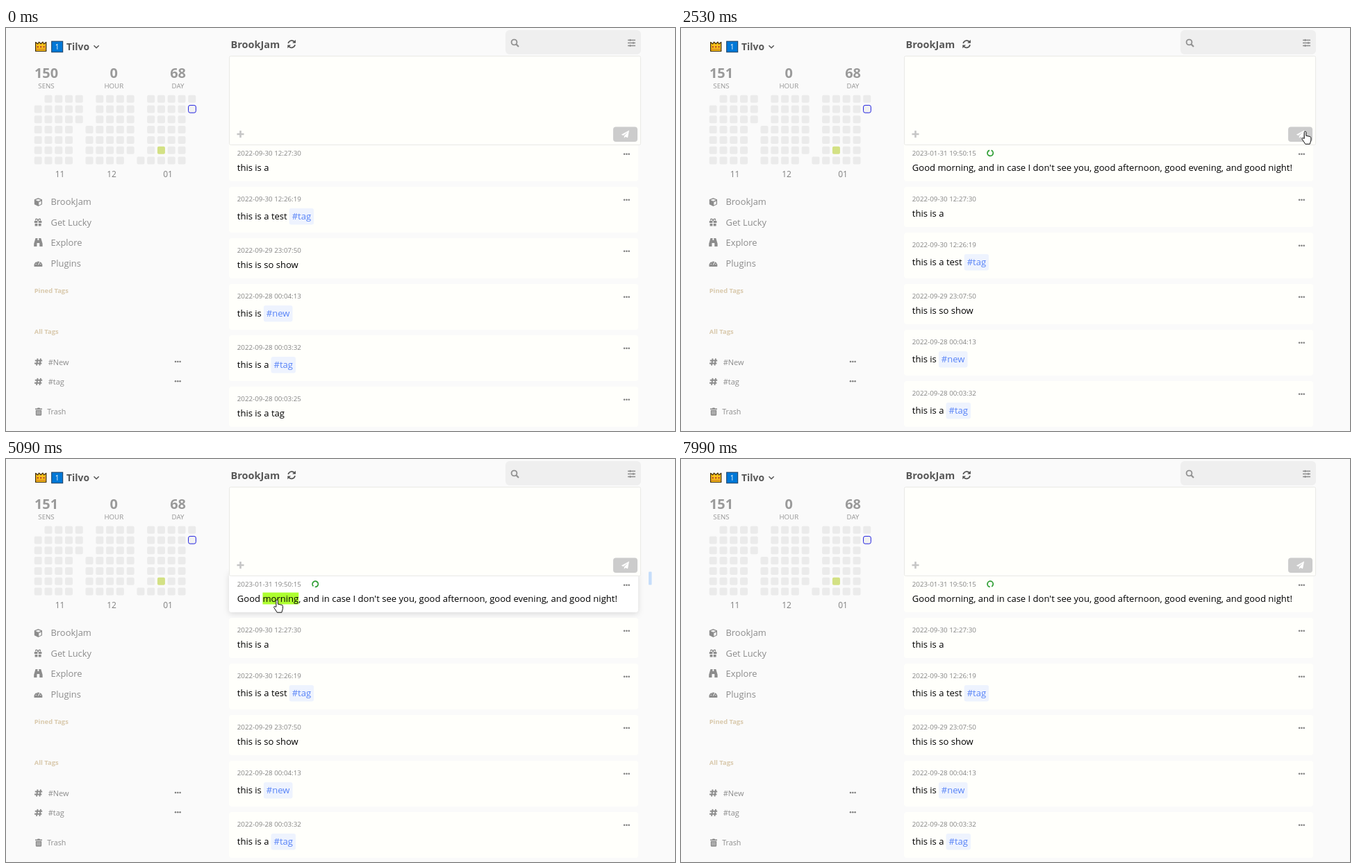
Animation of 963x581 px, one loop 8.05 s. Source, as an HTML page:

```html
<!DOCTYPE html>
<html lang="en">
<head>
<meta charset="utf-8">
<title>Memo board</title>
<style>
html, body { margin: 0; width: 100%; height: 100%; overflow: hidden; background: #fafafa; }
svg { display: block; width: 963px; height: 581px; font-family: "Open Sans", "Noto Sans", sans-serif; }
.b { font-weight: 700; }
.mid { text-anchor: middle; }
.mono { font: 11.7px "Liberation Mono", monospace; white-space: pre; }
</style>
</head>
<body>
<svg id="stage" viewBox="0 0 963 581"></svg>
<script>
const LOOP = 8050, POST = 2530, PASTE = 910;
const QUOTE = "Good morning, and in case I don't see you, good afternoon, good evening, and good night!";
const stage = document.getElementById("stage");

function add(parent, tag, attrs, text) {
  const el = document.createElementNS("http://www.w3.org/2000/svg", tag);
  for (const k in attrs) el.setAttribute(k, attrs[k]);
  if (text !== undefined) el.textContent = text;
  parent.appendChild(el);
  return el;
}
const rect = (p, x, y, width, height, rx, fill, more) =>
  add(p, "rect", { x, y, width, height, rx, fill, ...more });
const label = (p, x, y, size, fill, text, cls = "") =>
  add(p, "text", { x, y, "font-size": size, fill, class: cls }, text);
const solid = (p, d, fill, more) => add(p, "path", { d, fill, ...more });
const line = (p, d, stroke, w, more) =>
  add(p, "path", { d, stroke, "stroke-width": w, fill: "none", ...more });
const group = (p, x = 0, y = 0) => add(p, "g", { transform: `translate(${x} ${y})` });
const show = (el, on) => el.setAttribute("visibility", on ? "visible" : "hidden");
const clamp = v => Math.max(0, Math.min(1, v));

function dots(p, x, y) {
  for (let i = -1; i < 2; i++) add(p, "circle", { cx: x + i * 3.3, cy: y, r: 1.3, fill: "#808080" });
}

// Sidebar
function sidebar() {
  const g = group(stage), grey = "#8c8c8c";
  solid(g, "M42.6 20.5l3.2 2.5 1.6-2.8 2.8 2.6 2.8-2.6 1.6 2.8 3.2-2.5v13h-15.2z", "#fcc21b", { stroke: "#3d2a08", "stroke-width": 1.2, "stroke-linejoin": "round" });
  line(g, "M43.2 30.8h14", "#d68a1c", 1.6);
  solid(g, "M44.8 26h2v2.4h-2zm4.4 0h2v2.4h-2zm4.4 0h2v2.4h-2z", "#b5462a");
  rect(g, 65.7, 19.2, 16, 15.6, 0, "#0078d7", { stroke: "#173a5e", "stroke-width": 1 });
  label(g, 73.7, 30.5, 10, "#fff", "1", "mid");
  label(g, 87, 32, 13.9, "#585858", "Tilvo", "b");
  line(g, "M126.5 25.2l3.6 3.6 3.6-3.6", "#555", 1.5);

  [[58, "150", "SENS"], [155.3, "0", "HOUR"], [247.5, "68", "DAY"]].forEach(([x, n, unit]) => {
    const num = label(g, x, 72, 19.9, "#9a9a9a", n, "b mid");
    if (n === "150") counter = num;
    label(g, x, 86.5, 9.7, "#949494", unit, "mid");
  });

  const full = "1111.11111.1111.";
  const rows = [".1111.1111.11111", "11111.1111.11111", "11111.1111.1111.", full, full, full, "1111.1111.11111."];
  rows.forEach((row, r) => [...row].forEach((c, i) => {
    if (c === ".") return;
    const x = 40.7 + i * 14.77, y = 96.7 + r * 14.8;
    if (r === 1 && i === 15) rect(g, x + .3, y - .1, 10.8, 10.8, 2.5, "#f2f2f2", { stroke: "#2222e0", "stroke-width": 1 });
    else rect(g, x, y, 11, 11, 2, r === 5 && i === 12 ? "#d3e184" : "#ebebeb");
  }));
  [[77.5, "11"], [152, "12"], [233, "01"]].forEach(([x, m]) => label(g, x, 214.5, 12, "#808080", m, "mid"));

  ["BrookJam", "Get Lucky", "Explore", "Plugins"].forEach((s, i) =>
    label(g, 64.5, 255.3 + i * 29.4, 12.9, grey, s));
  solid(g, "M46.4 245l5.6 2.3v7l-5.6 2.6-5.6-2.6v-7z", grey);
  solid(g, "M46.4 246.4l4 1.6-4 1.7-4-1.7zM47.2 251l3.6-1.5v4.2l-3.6 1.7z", "#f2f2f2");
  solid(g, "M40.8 278h4.6v3h-4.6zm6 0h4.6v3h-4.6zM41.6 282h3.8v3.5h-3.8zm5.2 0h3.8v3.5h-3.8z", grey);
  line(g, "M46.1 278c-1-4-4.5-3.4-3 -.6M46.1 278c1-4 4.5-3.4 3-.6", grey, 1.4);
  solid(g, "M42.5 303h3v3h1.8v-3h3l2.3 8v4h-4.3v-5h-3.8v5h-4.3v-4z", grey);
  solid(g, "M40.5 343.5a6 6 0 1 1 11.8 0q0 .5-.6.5h-10.6q-.6 0-.6-.5z", grey);
  line(g, "M46.4 341.5l2.2-4.5M42.6 340.5h1.2M44 337l.8.8M49.2 340.5h1.2", "#fafafa", 1);

  label(g, 40.7, 382, 9.4, "#d9c9ac", "Pined Tags", "b");
  label(g, 40.7, 441.3, 9.4, "#d9c9ac", "All Tags", "b");
  [[481.5, "#New"], [509.8, "#tag"]].forEach(([y, s]) => {
    line(g, `M45.6 ${y - 5}l-1.6 10M50 ${y - 5}l-1.6 10M41.8 ${y - 2}h10.4M41 ${y + 2}h10.4`, grey, 1.9);
    label(g, 60.7, y + 4, 11, grey, s);
    dots(g, 247.3, y - .5);
  });
  solid(g, "M42 548.6h3l.7-1h2.6l.7 1h3v1.5h-10zM42.8 550.8h8.4v6.6q0 1.4-1.4 1.4h-5.6q-1.4 0-1.4-1.4z", grey);
  line(g, "M45 552.2v5M47 552.2v5M49 552.2v5", "#fafafa", .6);
  label(g, 59.2, 557.2, 10.7, grey, "Trash");
}

// Memo cards
const memos = [
  ["2023-01-31 19:50:15", QUOTE],
  ["2022-09-30 12:27:30", "this is a"],
  ["2022-09-30 12:26:19", "this is a test", "#tag"],
  ["2022-09-29 23:07:50", "this is so show"],
  ["2022-09-28 00:04:13", "this is", "#new"],
  ["2022-09-28 00:03:32", "this is a", "#tag"],
  ["2022-09-28 00:03:25", "this is a tag"]
];
function card([date, text, tag], y) {
  const el = group(stage, 0, y), h = tag ? 66 : 58, base = tag ? 47.3 : 43.3;
  rect(el, 321, 0, 589, h, 4, "#fffffb");
  const lift = rect(el, 321, 0, 589, h, 4, "#fff", { opacity: 0, style: "filter:drop-shadow(0 2px 4px rgba(0,0,0,.13))" });
  const mark = rect(el, 0, 29.5, 0, 17, 0, "#adff2f");
  label(el, 332.8, 21.2, 9.75, "#838383", date);
  const body = label(el, 332.8, base, 13.06, "#000", text);
  if (tag) {
    const x = 332.8 + body.getComputedTextLength() + 3;
    const pill = rect(el, x, 31, 0, 23.5, 3, "#eef3fe");
    const t = label(el, x + 4, base, 13.06, "#5783f7", tag);
    pill.setAttribute("width", t.getComputedTextLength() + 8);
  }
  dots(el, 893.4, 18.7);
  return { el, lift, mark, body, y, h };
}

let counter;
sidebar();
label(stage, 323.5, 29, 14.5, "#585858", "BrookJam", "b");
line(stage, "M406.3 22.2a5 5 0 0 1 8.8-2.3M416 24.2a5 5 0 0 1-8.8 2.3", "#555", 1.7);
solid(stage, "M417 17v4.8h-4.8zM405.3 29.3v-4.8h4.8z", "#555");
rect(stage, 719, 3, 195, 35, 6, "#efefef");
add(stage, "circle", { cx: 731.5, cy: 20.5, r: 3.9, fill: "none", stroke: "#949494", "stroke-width": 1.9 });
line(stage, "M734.4 23.4l3.6 3.6", "#949494", 2.2);
line(stage, "M895 17.5h11M895 21.5h11M895 25.5h11M898.5 16v3M903 20v3M898.5 24v3", "#8c8c8c", 1.3);

let top0 = 163;
const cards = memos.map(m => {
  const c = card(m, top0);
  top0 += c.h + 8;
  return c;
});
const SHIFT = cards[0].h + 8;
const spinner = add(cards[0].el, "circle", { r: 4.1, fill: "none", stroke: "#2f9e34", "stroke-width": 1.8, "stroke-dasharray": "22.6 3.2" });
const words = [...QUOTE.matchAll(/[\w']+/g)].map(m => [
  cards[0].body.getStartPositionOfChar(m.index).x,
  cards[0].body.getEndPositionOfChar(m.index + m[0].length - 1).x
]);

// Editor
const editor = group(stage);
const glow = rect(editor, 321.5, 40.5, 592, 128, 2, "#add8e6", { style: "filter:drop-shadow(0 1px 5px #9fd3e6)" });
rect(editor, 321.5, 40.5, 592, 128, 2, "#fffffb", { stroke: "#e9e9e6", "stroke-width": 1 });
const draft = group(editor);
[QUOTE.slice(0, 76), QUOTE.slice(77)].forEach((s, i) =>
  add(draft, "text", { x: 333.3, y: 64.8 + i * 16, class: "mono", fill: "#111" }, s));
line(editor, "M337.5 148v10M332.5 153h10", "#c6c6c6", 2.6);
const send = rect(editor, 874, 142.5, 35, 21.5, 4, "#ccc");
solid(editor, "M897 147.6l-2 10.6-3.4-1.5-1.8 2.3v-3.2l5.4-6-6.5 5.3-3-1.3z", "#fff");
const thumb = rect(stage, 925, 162.5, 4.5, 19, 1, "#c5ddfa");

// Pointer shapes, each with its hot spot at 0,0
const pointer = group(stage);
const ink = { stroke: "#111", "stroke-width": 1, "stroke-linejoin": "round" };
const shapes = {
  arrow: solid(pointer, "M0 0V12.3L2.9 9.7 5 14.4 7 13.5 4.9 9H8.6z", "#fff", ink),
  hand: solid(pointer, "M-1.3 10V1.2a1.3 1.3 0 0 1 2.6 0V6l5.4 1.2q1.6.4 1.6 2v3.3l-1.6 5.5h-6.6l-4.4-6.8c-1-1.7.9-2.5 1.8-1.4z", "#fff", ink),
  beam: line(pointer, "M-3-7h2q1 0 1 1V6q0 1-1 1h-2M3-7h-2q-1 0-1 1V6q0 1 1 1h2", "#444", 1)
};

const path = [
  [60, 918, 505], [200, 800, 350], [340, 620, 170], [450, 520, 100], [610, 490, 90],
  [1210, 490, 90], [1330, 760, 132], [1450, 852, 143], [1700, 893, 147], [1930, 899, 149],
  [2530, 899, 149], [2750, 800, 214], [3100, 560, 218], [3390, 488, 212], [3550, 500, 205],
  [3900, 410, 203], [4190, 376, 204], [4350, 850, 206], [4460, 868, 288], [4570, 720, 288],
  [4620, 655, 255], [4670, 621, 211], [4800, 560, 203], [5050, 400, 203], [5250, 352, 204],
  [5630, 361, 206], [5700, 380, 230], [5890, 540, 432], [6300, 940, 520], [6730, 950, 567], [6900, 938, 590]
];
function cursorAt(t) {
  const i = path.findIndex(p => p[0] > t);
  if (i < 1) return null;
  const [t0, x0, y0] = path[i - 1], [t1, x1, y1] = path[i];
  const k = (t - t0) / (t1 - t0);
  return [x0 + (x1 - x0) * k, y0 + (y1 - y0) * k];
}

const cardTop = (i, t) => t < POST && i ? cards[i].y - SHIFT : cards[i].y;
function hovered(i, t) {
  const p = cursorAt(t);
  if (!p || (t < POST && i === 0)) return 0;
  const y = p[1] - cardTop(i, t);
  return +(p[0] > 321 && p[0] < 910 && p[1] > 168 && y > 0 && y < cards[i].h);
}
// Averaging recent hover states gives a soft fade
function lift(i, t) {
  let sum = 0;
  for (let k = 0; k < 6; k++) sum += hovered(i, t - k * 40);
  return sum / 6;
}

function draw(t) {
  const posted = t >= POST, pasted = t >= PASTE && !posted, p = cursorAt(t);
  counter.textContent = posted ? "151" : "150";
  cards.forEach((c, i) => {
    c.el.setAttribute("transform", `translate(0 ${cardTop(i, t)})`);
    c.lift.setAttribute("opacity", lift(i, t));
  });
  show(cards[0].el, posted);
  spinner.setAttribute("transform", `translate(445.2 17.3) rotate(${(t - POST) * .36 - 70})`);
  glow.setAttribute("opacity", clamp((t - 450) / 150) * clamp((1930 - t) / 120));
  show(draft, pasted);
  send.setAttribute("fill", pasted ? "#0000ff" : "#ccc");
  show(thumb, t >= 2590 && t < 5750);

  const word = posted && p && p[1] > 192 && p[1] < 210 && words.find(w => p[0] >= w[0] && p[0] <= w[1]);
  const mark = cards[0].mark;
  mark.setAttribute("width", word ? word[1] - word[0] : 0);
  if (word) mark.setAttribute("x", word[0]);

  show(pointer, p);
  if (!p) {
    for (const k in shapes) show(shapes[k], false);
    return;
  }
  const [x, y] = p;
  const onSend = x > 874 && x < 909 && y > 142 && y < 164;
  const onText = x > 321 && x < 913 && y > 40 && y < 140;
  const kind = word || onSend ? "hand" : onText ? "beam" : "arrow";
  for (const k in shapes) show(shapes[k], k === kind);
  pointer.setAttribute("transform", `translate(${x} ${y})`);
}

const start = performance.now();
function tick() {
  draw((performance.now() - start) % LOOP);
  requestAnimationFrame(tick);
}
tick();
</script>
</body>
</html>
```
